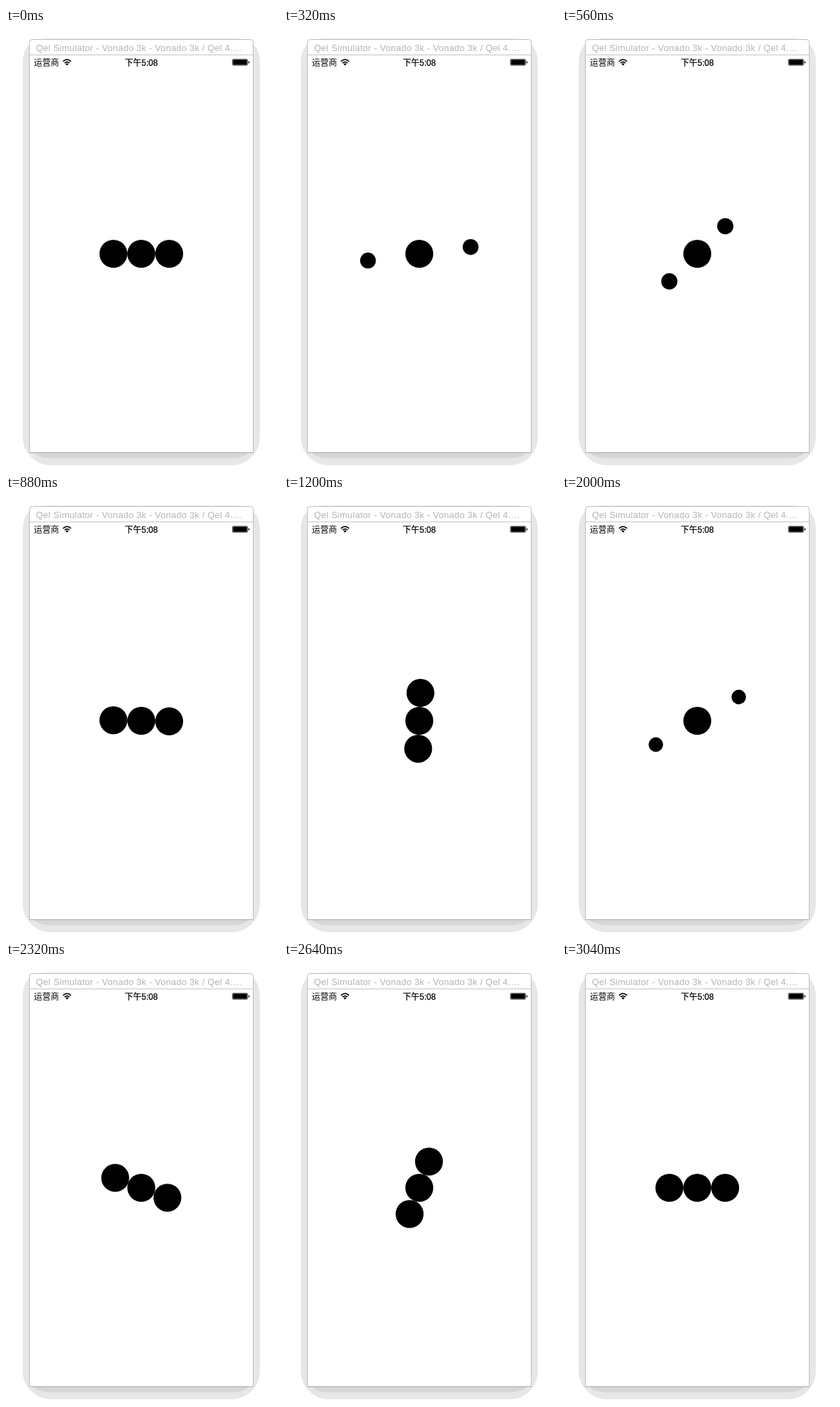
Write an HTML page that moves like this. It is 390 by 628 pixels and loops after 3.12 s.

```html
<!DOCTYPE html>
<html lang="zh">
<head>
<meta charset="utf-8">
<title>Three ball loader</title>
<style>
  html, body { margin: 0; width: 100%; height: 100%; overflow: hidden; background: #fff; }
  svg { display: block; width: 390px; height: 628px; }
  .title { font: 13px "Liberation Sans", Arial, sans-serif; letter-spacing: .26px; fill: #b4b4b4; }
  .status { font: 12px "Liberation Sans", "Noto Sans CJK SC", "Noto Sans CJK", sans-serif; }
  .time { font-weight: 500; stroke: #000; stroke-width: .25px; }
</style>
</head>
<body>
<svg viewBox="0 0 390 628">
  <!-- window shadow -->
  <path fill="#e7e7e7" d="M24 50Q24 15 60 15H328Q364 15 364 50V586A40 40 0 0 1 324 625.5H63A40 40 0 0 1 24 586Z"/>
  <path fill="#d6d6d6" d="M38 606Q46 615.5 66 615.5H322Q342 615.5 350 606Z"/>

  <!-- window -->
  <path fill="#fff" stroke="#bcbcbc" d="M33.5 607.5V20.5Q33.5 16.5 37.5 16.5H350.5Q354.5 16.5 354.5 20.5V607.5Z"/>
  <path stroke="#a9a9a9" d="M34 607.5H354"/>
  <path stroke="#c4c4c4" d="M34 38.5H354"/>
  <text class="title" x="43" y="33">Qel Simulator - Vonado 3k - Vonado 3k / Qel 4.…</text>

  <!-- status bar -->
  <text class="status" x="40" y="54">运营商</text>
  <g fill="none" stroke="#000" stroke-width="1.7">
    <path d="M81.8 47.8Q87.5 42.4 93.2 47.8"/>
    <path d="M84 50.2Q87.5 46.9 91 50.2"/>
  </g>
  <path d="M85.4 51.5Q87.5 49.7 89.6 51.5L87.5 53.8Z"/>
  <text class="status time" x="194" y="54" text-anchor="middle">下午5:08</text>
  <rect x="324.5" y="44.5" width="22" height="9" rx="1.5" fill="#fff" stroke="#555" stroke-width=".8"/>
  <rect x="325.3" y="45.2" width="20.4" height="7.6" rx=".8"/>
  <path d="M347.6 47.2Q349.2 47.6 349.2 49T347.6 50.8Z"/>

  <!-- balls -->
  <circle id="left" cx="154" cy="323" r="20"/>
  <circle cx="194" cy="323" r="20"/>
  <circle id="right" cx="234" cy="323" r="20"/>
</svg>
<script>
  const LOOP = 3120, STEP = 80;
  const START = 55, CYCLE = 1507;
  const CX = 194, CY = 323, R = 20, ORBIT = 40;
  const SPREAD_START = 3, SPREAD = 375;

  // Turn keys: time in ms, degrees, degrees per ms
  const turn = [
    [110, 0, 0], [438, 58.2, .33], [505, 80.6, .33],
    [1078, 249.7, .275], [1238, 292.3, .27], [1475, 360, .27]
  ];

  const left = document.getElementById('left');
  const right = document.getElementById('right');
  const clamp = x => Math.min(1, Math.max(0, x));

  function angleAt(t) {
    if (t <= turn[0][0]) return 0;
    const i = turn.findIndex(k => t < k[0]);
    if (i < 0) return 360;
    const [t0, a, va] = turn[i - 1], [t1, b, vb] = turn[i];
    const d = t1 - t0, s = (t - t0) / d, q = 1 - s;
    return a * (1 + 2 * s) * q * q + va * d * s * q * q
         + b * s * s * (3 - 2 * s) - vb * d * s * s * q;
  }

  // Timing curve with control points (x1, y1), (x2, y2)
  function bezier(x1, y1, x2, y2) {
    const at = (p, q, s) => 3 * (1 - s) * s * ((1 - s) * p + s * q) + s * s * s;
    return x => {
      let lo = 0, hi = 1;
      for (let i = 0; i < 24; i++) {
        const mid = (lo + hi) / 2;
        if (at(x1, x2, mid) < x) lo = mid; else hi = mid;
      }
      return at(y1, y2, (lo + hi) / 2);
    };
  }
  const easeOut = bezier(0, 0, .58, 1);
  const easeIn = bezier(.42, 0, 1, 1);

  function spreadAt(t) {
    const x = (t - SPREAD_START) / SPREAD;
    if (x <= 0 || x >= 2) return 0;
    return x < 1 ? easeOut(clamp(x)) : 1 - easeIn(clamp(x - 1));
  }

  function place(ball, dx, dy, r) {
    ball.setAttribute('cx', CX + dx);
    ball.setAttribute('cy', CY + dy);
    ball.setAttribute('r', r);
  }

  function draw(now) {
    const t = Math.floor(now % LOOP / STEP) * STEP - START;
    const local = t < CYCLE ? t : t - CYCLE;
    const angle = angleAt(local) * Math.PI / 180;
    const u = spreadAt(local);
    const dx = ORBIT * (Math.cos(angle) + u);
    const dy = -ORBIT * Math.sin(angle);
    const r = R * (1 - u / 2);
    place(right, dx, dy, r);
    place(left, -dx, -dy, r);
  }

  let begin;
  function tick(now) {
    begin ??= now;
    draw(now - begin);
    requestAnimationFrame(tick);
  }
  draw(0);
  requestAnimationFrame(tick);
</script>
</body>
</html>
```
